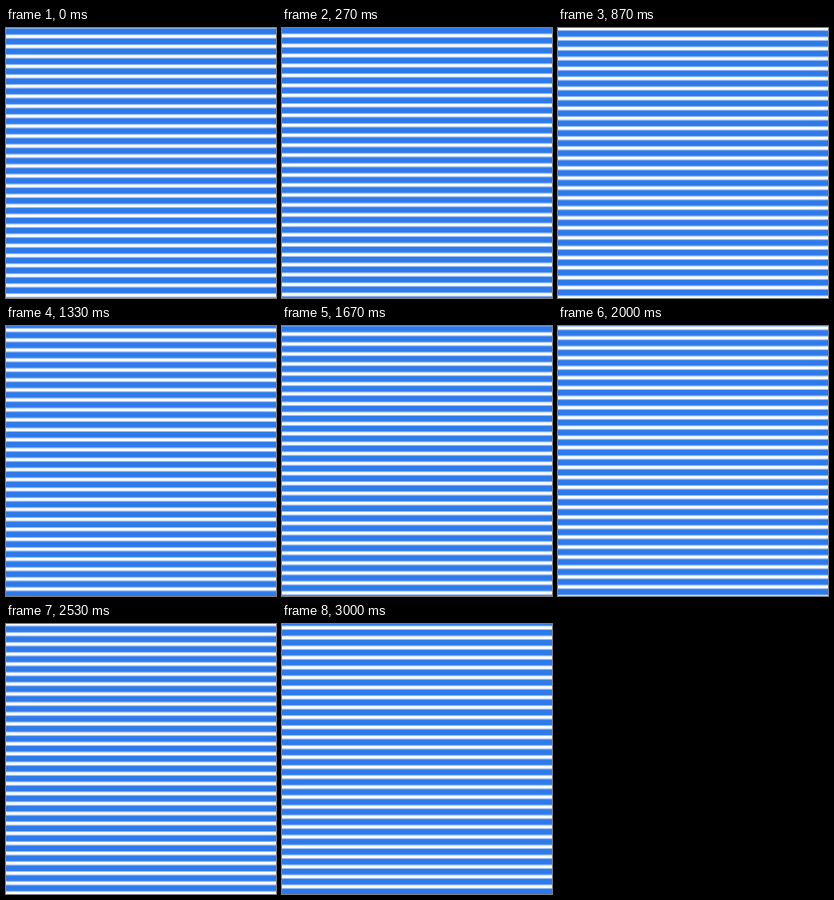
An HTML page with a canvas for the animation above (3070 ms loop, 270 by 270 pixels).

```html
<!DOCTYPE html>
<html lang="en">
<head>
<meta charset="utf-8">
<title>Stripes</title>
<style>
  html, body { margin: 0; width: 100%; height: 100%; overflow: hidden; background: #fff; }
  canvas { display: block; width: 270px; height: 270px; }
</style>
</head>
<body>
<canvas id="stage" width="270" height="270"></canvas>
<script>
  const SIZE = 270;
  const LOOP = 3070;
  const STEPS = 46;
  const STEP_MS = 200 / 3;
  const PERIOD = 9.958;
  const BAND = 6.4;
  const SOFT = 2;    // width of the blurred edge
  const FIRST = 3.5; // centre of the top stripe at the start
  const TURNS = 22;  // periods travelled per loop
  const ctx = document.getElementById('stage').getContext('2d');

  // Steps begin on whole hundredths of a second.
  function stepAt(ms) {
    const tick = Math.floor(ms / 10) * 10 + 5;
    return Math.min(STEPS - 1, Math.floor(tick / STEP_MS));
  }

  // Share of blue at height y for stripes centred on c.
  function cover(y, c) {
    const turns = (y - c) / PERIOD;
    const dist = Math.abs(turns - Math.round(turns)) * PERIOD;
    return Math.max(0, Math.min(1, (BAND / 2 - dist) / SOFT + 0.5));
  }

  function draw(ms) {
    const centre = FIRST + stepAt(ms) * TURNS * PERIOD / STEPS;
    ctx.globalAlpha = 1;
    ctx.fillStyle = '#fff';
    ctx.fillRect(0, 0, SIZE, SIZE);
    ctx.fillStyle = '#2f7aea';
    for (let y = 0; y < SIZE; y++) {
      ctx.globalAlpha = cover(y + 0.5, centre);
      ctx.fillRect(0, y, SIZE, 1);
    }
  }

  const start = performance.now();
  function tick() {
    draw((performance.now() - start) % LOOP);
    requestAnimationFrame(tick);
  }
  tick();
</script>
</body>
</html>
```
